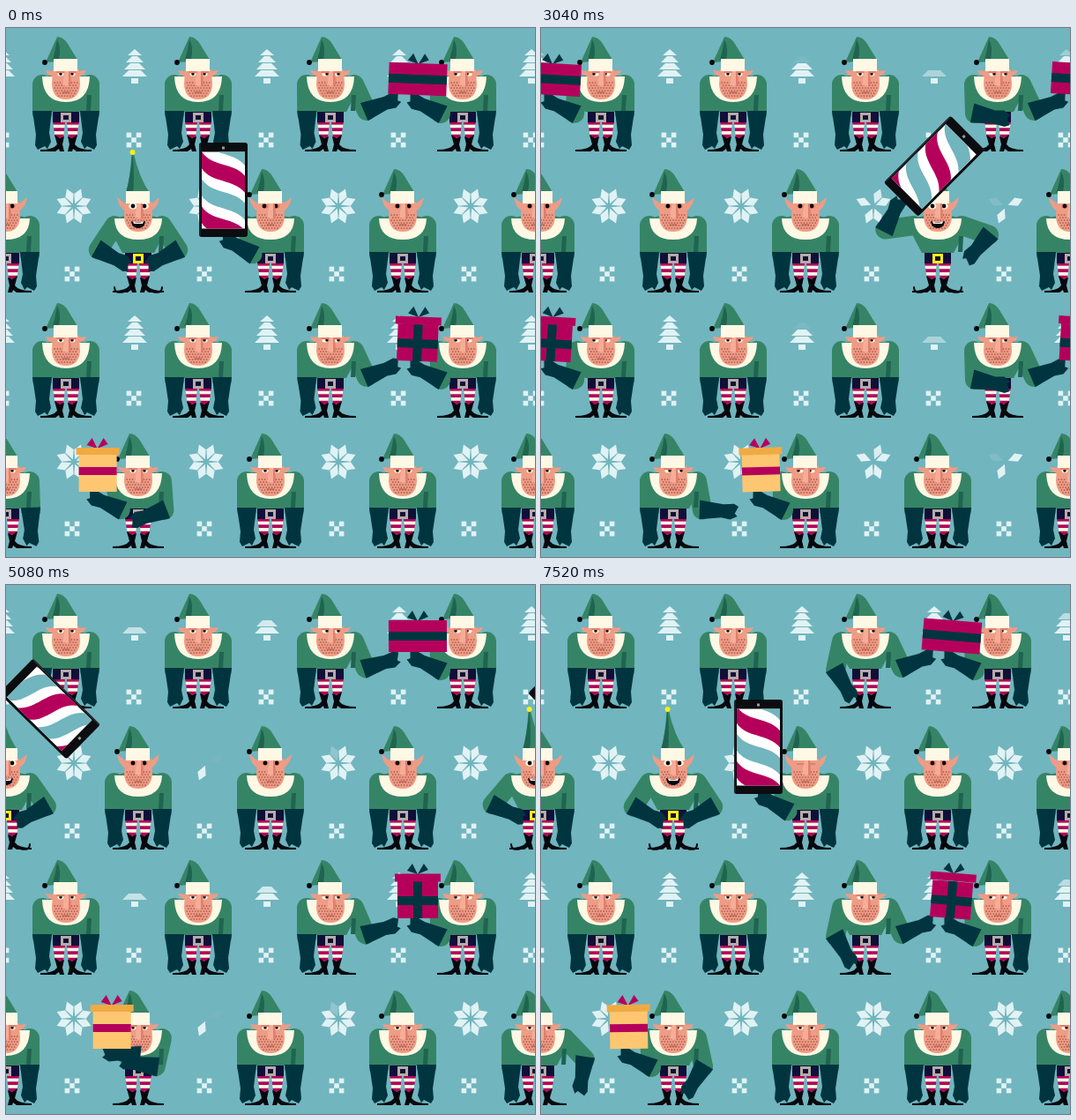
Recreate the animation shown at these times as an HTML page with a canvas. Size 600x600 px, loop 7560 ms.

```html
<!DOCTYPE html>
<html lang="en">
<head>
<meta charset="utf-8">
<title>Elves passing presents</title>
<style>
html, body { margin: 0; width: 100%; height: 100%; overflow: hidden; background: #71b5be; }
canvas { display: block; width: 600px; height: 600px; }
</style>
</head>
<body>
<canvas id="stage"></canvas>
<script>
const LOOP = 7560, STEP = 40, PASS = LOOP / 12, THROW = LOOP / 4;
const C = {
  bg: '#71b5be', pale: '#e1f2f4', green: '#368466', dark: '#1f6450', navy: '#00353f',
  ink: '#06080d', belt: '#100f38', cream: '#fff8e4', skin: '#ee9c85', blush: '#e07f6d',
  dot: '#a4544b', pink: '#b5005b', gold: '#fdc671', amber: '#f0aa43', yellow: '#f9ee1a',
  buckle: '#b5aca6', white: '#fff', brown: '#c2674f'
};
const canvas = document.getElementById('stage');
const g = canvas.getContext('2d');
const dpr = window.devicePixelRatio || 1;
canvas.width = canvas.height = 600 * dpr;

// ---------- helpers ----------
const lerp = (a, b, k) => a + (b - a) * k;
const mix = (p, q, k) => [lerp(p[0], q[0], k), lerp(p[1], q[1], k)];
const clamp = (v, lo = 0, hi = 1) => Math.max(lo, Math.min(hi, v));
const mod = (a, n) => ((a % n) + n) % n;
const ramp = (t, a, b) => clamp((t - a) / (b - a));
const ease = (t, a, b) => { const k = ramp(t, a, b); return k * k * (3 - 2 * k); };
const bump = (t, a, b, c, d) => ease(t, a, b) * (1 - ease(t, c, d));
const rad = deg => deg * Math.PI / 180;

function shape(d, color) { g.fillStyle = color; g.fill(new Path2D(d)); }
function rect(x, y, w, h, color) { g.fillStyle = color; g.fillRect(x, y, w, h); }
function oval(x, y, rx, ry, color) {
  g.fillStyle = color;
  g.beginPath(); g.ellipse(x, y, rx, ry, 0, 0, 7); g.fill();
}
function stroke(d, color, width) {
  g.strokeStyle = color; g.lineWidth = width; g.lineCap = g.lineJoin = 'round';
  g.stroke(new Path2D(d));
}
function placed(x, y, deg, draw) {
  g.save(); g.translate(x, y); g.rotate(rad(deg)); draw(); g.restore();
}
// Repeats anything that leaves one side of the stage on the other side.
function wrapped(x, y, deg, draw) {
  x = mod(x, 600);
  for (const dx of [-600, 0, 600])
    if (x + dx > -115 && x + dx < 715) placed(x + dx, y, deg, draw);
}

// ---------- motion ----------
// Box centre relative to the elf receiving it: catch, pull in, wind up, push on.
function boxX(q) {
  return -56 + 5 * ease(q, -110, -10) + 56 * ease(q, 170, 340)
    + 9 * ease(q, 360, 410) + 80 * ease(q, 410, 510);
}
function boxTilt(q) {
  const swing = 5 * Math.cos((q + 50) / 55) * Math.exp(-(q + 50) / 150);
  return swing * (1 - ease(q, 150, 220)) + 4 * ease(q, 410, 510);
}
// Phone relative to its receiver: a spinning toss to the next elf.
function phonePose(q) {
  const k = ramp(q, 1030, 1590);
  return {
    x: -53.5 + 150 * Math.sin(k * Math.PI / 2),
    y: -116.5 - 43 * Math.sin(k * Math.PI),
    turn: 360 * k ** 1.35
  };
}
const cheerAt = q => bump(q, 250, 340, 2160, 2330);

const REST = [27, -3], HIPS = [12, -30], WAVE = [34, -36];
const mirror = ([x, y]) => [-x, y];
// A hand swings out sideways before it rises.
const reach = (from, to, w) => [lerp(from[0], to[0], w * (2 - w)), lerp(from[1], to[1], w)];

function boxHands(q) {
  const x = boxX(q), far = q < -110 ? -68 : x;
  return {
    left: reach(mirror(REST), [clamp(far - 8, -76, 20), -60], bump(q, -320, -210, 420, 640)),
    right: reach(REST, [clamp(x + 8, -20, 76), -61], bump(q, 120, 290, 640, 850))
  };
}
function phoneHands(q) {
  const p = phonePose(q < -300 ? -300 : Math.min(q, 1200)), a = rad(p.turn), u = cheerAt(q);
  const grip = [p.x - 54 * Math.sin(a), p.y + 54 * Math.cos(a)];
  const free = mix(WAVE, HIPS, ease(q, 1150, 1320));
  return {
    left: reach(mirror(mix(REST, HIPS, u)), grip, bump(q, -500, -320, 1160, 1320)),
    right: mix(REST, free, u)
  };
}

// ---------- pattern ----------
// Decorations fade out and are rebuilt as two waves cross the stage.
function waveAge(x, t) {
  const age = t - 700 - (x - 77) * 4.3;
  return age >= 3040 ? age - 3040 : age;
}
const remaining = (age, n, gone, from, full) =>
  age < 0 ? n : Math.max(n - ramp(age, 0, gone) * n * .87, ramp(age, from, full) * n);

function tree(x, y, age) {
  const left = remaining(age, 4, 650, 850, 1900);
  for (let i = 0; i < 4; i++) {
    const bottom = y - 12 + 8 * i, wide = 8 + 2 * i, top = i ? wide - 7 : 0;
    g.globalAlpha = clamp(left - 3 + i);
    shape(`M${x - top} ${bottom - 7}L${x + top} ${bottom - 7}L${x + wide} ${bottom}L${x - wide} ${bottom}Z`, C.pale);
  }
  g.globalAlpha = 1;
  rect(x - 4, y + 14, 8, 6, C.pale);
}
function flake(x, y, age) {
  const left = remaining(age, 8, 480, 650, 1300);
  for (let i = 0; i < 8; i++) {
    g.globalAlpha = clamp(left - i);
    placed(x, y, 112.5 - i * 135, () => shape('M3 0L13 -5L21 0L13 5Z', C.pale));
  }
  g.globalAlpha = 1;
}
function checks(x, y) {
  for (let i = 0; i < 9; i += 2)
    rect(x - 8.4 + (i % 3) * 5.6, y - 8.4 + Math.floor(i / 3) * 5.6, 5.6, 5.6, C.pale);
}
function pattern(t) {
  for (let i = 0; i < 5; i++) {
    const x = 150 * i - 4, f = 150 * i + 77;
    for (const y of [43, 345]) tree(x, y, waveAge(i ? x : 596, t));
    for (const y of [127, 420]) checks(x - 1, y);
    for (const y of [202, 492]) flake(f, y, waveAge(f, t));
    for (const y of [279, 568]) checks(f - 2, y);
  }
}

// ---------- elf ----------
// Elbow of a two-part arm, worked out for the right side and mirrored.
const UPPER = 33, FORE = 38;
function bendArm(side, [hx, hy]) {
  const sx = 27, sy = -76, dx = hx * side - sx, dy = hy - sy;
  const d = Math.max(8, Math.hypot(dx, dy)), ux = dx / d, uy = dy / d;
  const dist = Math.min(d, UPPER + FORE);
  const along = (UPPER ** 2 - FORE ** 2 + dist ** 2) / (2 * dist);
  const out = Math.sqrt(Math.max(0, UPPER ** 2 - along ** 2)) * (dx > dy * .5 ? -1 : 1);
  const ex = sx + ux * along + uy * out, ey = sy + uy * along - ux * out;
  return { side, sx: sx * side, sy, ex: ex * side, ey, angle: Math.atan2(hy - ey, hx - ex * side) };
}
function sleeve(a) { stroke(`M${a.sx} ${a.sy}L${a.ex} ${a.ey}`, C.green, 22); }
function glove(a) {
  placed(a.ex, a.ey, a.angle * 180 / Math.PI - 90, () => {
    g.scale(-a.side, 1);
    shape('M-11 -3L11 -3L8 22L10 32L6 40L3 37L-5 41L-8 36L-7 24Z', C.navy);
  });
}
function legs(cheer) {
  for (const s of [-1, 1]) {
    g.save(); g.scale(s, 1);
    g.save(); g.clip(new Path2D('M1 -34L15 -34L12 -15L3 -15Z'));
    for (let i = 0; i < 5; i++) rect(0, -34 + i * 3.7, 16, 3.8, i % 2 ? C.cream : C.pink);
    g.restore();
    shape('M2 -17L7 -15L13 -19L10 -8Q14 -2 29 -2L29 0L12 0L8 -3L7 0L2 0L4 -8Z', C.ink);
    if (cheer > .3) stroke('M16 -1Q27 2 27 -6', C.ink, 2);
    g.restore();
  }
}
function eye(x, o) {
  if (o.blink) return rect(x - 4, -88, 8, 2, C.blush);
  const wide = o.cheer > .3, pupil = o.tall ? 2.4 : 1.8;
  oval(x, -88, wide ? 4.8 : 3.6, wide ? 3.7 : 2.6, o.tall && !wide ? C.blush : C.cream);
  oval(x + o.look * 2, -88, pupil, pupil, C.ink);
  if (!o.tall) rect(x - 4.5, -92, 9, 3.2, C.blush);
}
function rays(x, y, near, far, sparkle) {
  if (sparkle <= 0 || sparkle >= 1) return;
  const a = lerp(near, far, Math.max(0, sparkle * 2 - 1)), b = lerp(near, far, Math.min(1, sparkle * 2.6));
  for (let i = 0; i < 7; i++) {
    const c = Math.cos(i * Math.PI / 3.5 + .6), s = Math.sin(i * Math.PI / 3.5 + .6);
    stroke(`M${x + c * a} ${y + s * a}L${x + c * b} ${y + s * b}`, C.yellow, 3);
  }
}
function hat(u, sparkle) {
  if (u < .03) {
    shape('M-10 -130Q-3 -130 2 -122L13 -104L-23 -101Z', C.green);
    shape('M-10 -127Q-5 -118 -8 -104L-15 -104Q-12 -114 -10 -127Z', C.dark);
    oval(-24, -101, 2.9, 2.9, C.ink);
    return;
  }
  const a = rad(lerp(190, 88, u)), r = 16 + 29 * Math.sqrt(clamp(u));
  const x = -8 + Math.cos(a) * r, y = -104 - Math.sin(a) * r, bend = -104 - r * .35;
  shape(`M-14 -103L13 -103Q1 ${bend} ${x + 1} ${y}L${x - 1} ${y}Q-9 ${bend} -14 -103Z`, C.green);
  shape(`M-14 -103L-6 -103Q-4 ${bend} ${x} ${y}Q-9 ${bend} -14 -103Z`, C.dark);
  oval(x, y, 3, 3, u > .8 ? C.yellow : '#c9b52b');
  rays(x, y, 8, 21, sparkle);
}
function head(o) {
  for (const s of [-1, 1])
    shape(o.tall ? `M${14 * s} -90L${24 * s} -98Q${22 * s} -86 ${14 * s} -82Z`
                 : `M${14 * s} -91L${23 * s} -92Q${21 * s} -86 ${14 * s} -85Z`, C.skin);
  shape('M-15 -93L15 -93L16 -76Q15 -59 0 -59Q-15 -59 -16 -76Z', C.skin);
  for (let row = 0; row < 6; row++)
    for (let i = -4; i <= 4; i++) {
      const x = i * 3.2 + (row % 2 ? 1.6 : 0);
      if (Math.abs(x) < 14.5 - row * row * .22) oval(x, -78 + row * 3, .85, .85, C.dot);
    }
  eye(-6, o); eye(7, o);
  shape('M-1 -91L4 -91L5 -76Q1 -72 -4 -76Z', '#f5ad97');
  shape('M3 -91L5 -91L6 -76L3 -74Z', C.blush);
  if (o.cheer > .3) {
    shape('M-8 -71Q0 -68 8 -71Q7 -63 0 -63Q-7 -63 -8 -71Z', C.ink);
    shape('M-6 -70.4Q0 -68 6 -70.4L5 -68L-5 -68Z', C.white);
  } else stroke('M-4 -67L4 -67', C.dot, 1);
  hat(o.cheer, o.sparkle);
  rect(-14, -105, 27, 14, C.cream);
}
function elf(o) {
  const arms = [bendArm(-1, o.left), bendArm(1, o.right)];
  legs(o.cheer);
  rect(-15, -46, 30, 13, C.belt);
  rect(-6, -44, 12, 11, o.cheer > .3 ? C.yellow : C.buckle);
  rect(-3, -41, 6, 5, C.belt);
  shape('M-35 -79Q-20 -89 0 -88Q20 -89 35 -79L25 -58L18 -45L-18 -45L-25 -58Z', C.green);
  arms.forEach(sleeve);
  shape('M24 -64L29 -64L28 -46L23 -46Z', C.dark);
  const top = o.tall ? -84 : -85, low = o.tall ? -60 : -56;
  shape(`M-27 ${top}L27 ${top}Q26 ${low} 0 ${low}Q-26 ${low} -27 ${top}Z`, C.cream);
  placed(0, o.tall ? -10 : 0, 0, () => head(o));
  arms.forEach(glove);
  rays(0, -38, 11, 26, o.sparkle);
}

// ---------- things to carry ----------
function bow(y, color) {
  shape(`M0 ${y}L-12 ${y - 4}L-6 ${y - 12}Z M0 ${y}L12 ${y - 5}L7 ${y - 12}Z`, color);
}
function wideBox() {
  bow(-17, C.navy);
  rect(-33, -18, 66, 36, C.pink);
  rect(-33, -5, 66, 10, C.navy);
}
function goldBox() {
  bow(-24, C.pink);
  rect(-21, -18, 43, 43, C.gold);
  rect(-21, -3, 43, 9, C.pink);
  rect(-24, -25, 49, 8, C.amber);
}
function imp() {
  shape('M-9 -8L-14 -32Q-14 -44 0 -44Q14 -44 14 -32L9 -8Z', C.brown);
  for (const s of [-1, 1]) {
    stroke(`M${10 * s} -23L${22 * s} -27L${25 * s} -34`, C.brown, 4);
    stroke(`M${28 * s} -36L${25 * s} -33L${23 * s} -38`, C.brown, 2);
    oval(5 * s, -38, 1.8, 1.8, C.ink);
  }
  shape('M-9 -33Q0 -31 9 -33Q8 -24 0 -24Q-8 -24 -9 -33Z', C.ink);
  oval(0, -26.5, 4, 1.8, C.pink);
}
function jackBox(t) {
  const m = t % (4 * PASS), lift = bump(m, 1350, 1480, 2300, 2500);
  if (lift > .15) {
    g.save(); g.beginPath(); g.rect(-40, -70, 80, 54); g.clip();
    g.translate(0, (1 - lift) * 34); imp(); g.restore();
  }
  rect(-23, -17, 46, 42, C.pink);
  rect(-5, -17, 10, 42, C.navy);
  rect(-23, 0, 46, 10, C.navy);
  placed(0, -21 - lift * 34, lift * 5 * Math.sin((m - 1800) / 130), () => {
    bow(-4, C.navy);
    rect(-26, -4.5, 52, 9, C.pink);
  });
}
// The screen shows candy stripes that scroll two periods per throw.
function phone(t) {
  g.fillStyle = '#0c0d10';
  g.beginPath(); g.roundRect(-27.5, -53.5, 55, 107, 3); g.fill();
  stroke('M-26.5 -51L-26.5 51', '#33363a', 1);
  rect(-1.5, -49, 3, 3, '#9a9da0');
  g.save();
  g.beginPath(); g.rect(-24.5, -43, 49, 87); g.clip();
  rect(-25, -44, 50, 89, C.white);
  const gap = 31, scroll = mod(-35 + 4 * gap * t / THROW, 2 * gap);
  for (let i = -4; i < 3; i++) {
    const y = scroll + i * gap;
    shape(`M-25 ${y - 9}C-14 ${y + 10} 12 ${y + 3} 25 ${y + 20}L25 ${y + 39}C12 ${y + 22} -14 ${y + 28} -25 ${y + 10}Z`,
      i % 2 ? C.bg : C.pink);
  }
  g.restore();
}

// ---------- rows ----------
function boxRow(t, firstX, ground, receiver, boxY, drawBox) {
  for (let j = 0; j < 4; j++) {
    const q = mod(t - PASS * (j - receiver) + 2 * PASS, 4 * PASS) - 2 * PASS;
    const look = q > -230 && q < 200 ? -1 : q > 400 && q < 800 ? 1 : 0;
    wrapped(firstX + 150 * j, ground, 0, () => elf({
      ...boxHands(q), look, cheer: 0, sparkle: 0, blink: q > -300 && q < -240
    }));
  }
  const n = Math.floor((t + 110) / PASS), q = t - n * PASS;
  wrapped(firstX + 150 * (receiver + n) + boxX(q), boxY, boxTilt(q), () => drawBox(t));
}
function phoneRow(t) {
  for (let j = 0; j < 4; j++) {
    const q = mod(t - THROW * (j - 2) + LOOP / 2, LOOP) - LOOP / 2;
    const kick = .18 * Math.sin(Math.PI * ramp(q, 340, 520));
    wrapped(150 * j, 300, 0, () => elf({
      ...phoneHands(q), tall: true, cheer: cheerAt(q) + kick, sparkle: ramp(q, 290, 640),
      look: q > -500 && q < 250 ? -.5 : 0, blink: q > -80 && q < -20
    }));
  }
  const n = Math.floor((t + 300) / THROW), p = phonePose(t - n * THROW);
  wrapped(300 + 150 * n + p.x, 300 + p.y, p.turn, () => phone(t));
}

function render(t) {
  g.setTransform(dpr, 0, 0, dpr, 0, 0);
  rect(0, 0, 600, 600, C.bg);
  pattern(t);
  boxRow(t, 68, 140, 3, 58, wideBox);
  boxRow(t, 68, 442, 3, 353, jackBox);
  boxRow(t + 200, 0, 590, 1, 501, goldBox);
  phoneRow(t);
}
const start = performance.now();
function tick() {
  const t = (performance.now() - start) % LOOP;
  render(Math.floor(t / STEP) * STEP);
  requestAnimationFrame(tick);
}
tick();
</script>
</body>
</html>
```
